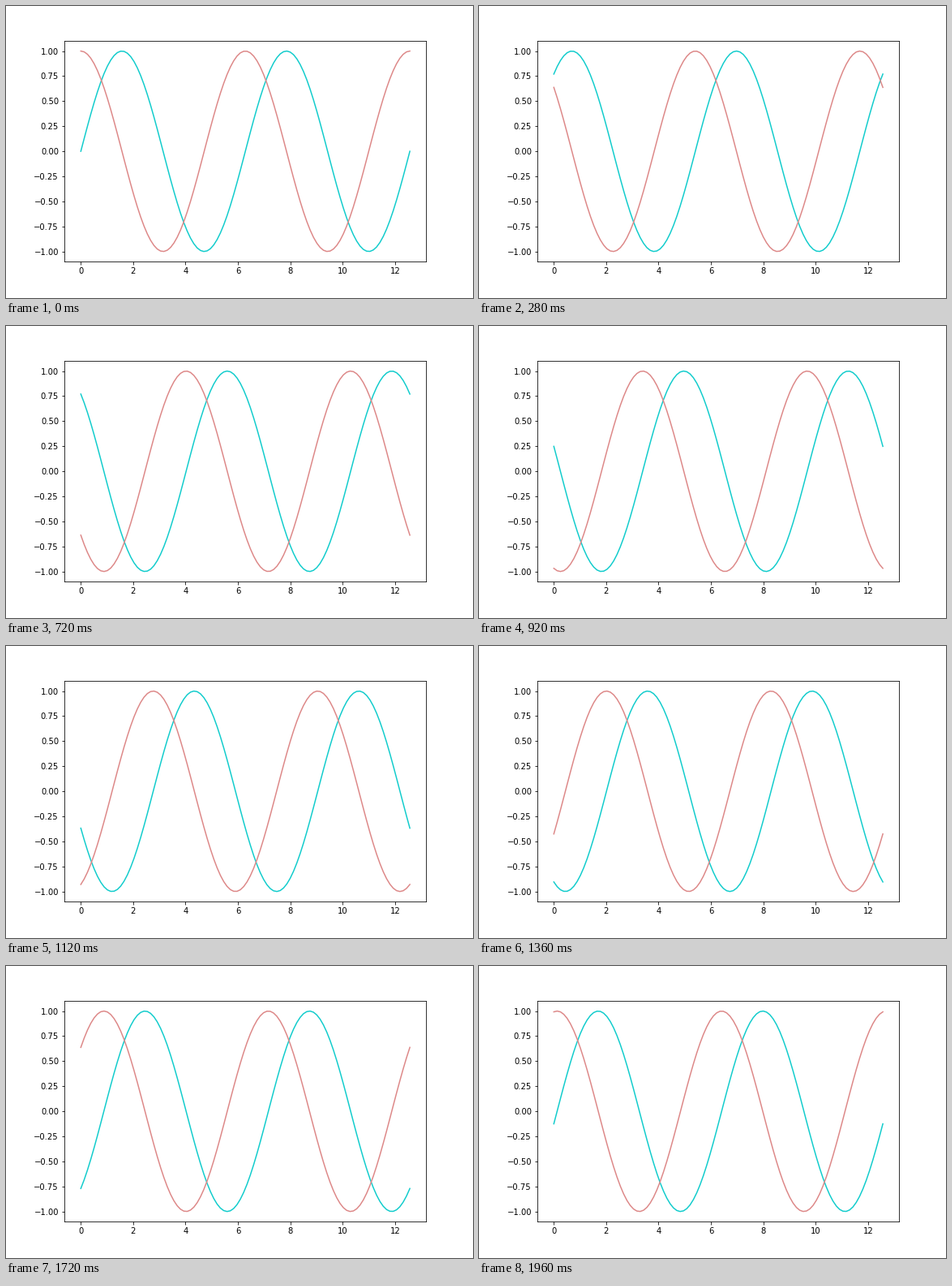
Animation, 576 px wide and 360 px high, one loop 2000 ms. Source, as a matplotlib script:

```python
import numpy as np
import matplotlib.pyplot as plt
from matplotlib.animation import FuncAnimation

FRAMES = 50
INTERVAL = 40

fig, ax = plt.subplots(figsize=(8, 5), dpi=72)
fig.subplots_adjust(left=0.125, right=0.9, bottom=0.125, top=0.88)
x = np.linspace(0, 4 * np.pi, 100)
sin_line, = ax.plot(x, np.sin(x), color="#11cccc")
cos_line, = ax.plot(x, np.cos(x), color="#dd8888")


def update(i):
    phase = 2 * np.pi * i / FRAMES
    sin_line.set_ydata(np.sin(x + phase))
    cos_line.set_ydata(np.cos(x + phase))
    return sin_line, cos_line


anim = FuncAnimation(fig, update, frames=FRAMES, interval=INTERVAL,
                     repeat=True, repeat_delay=0)
plt.show()
```
